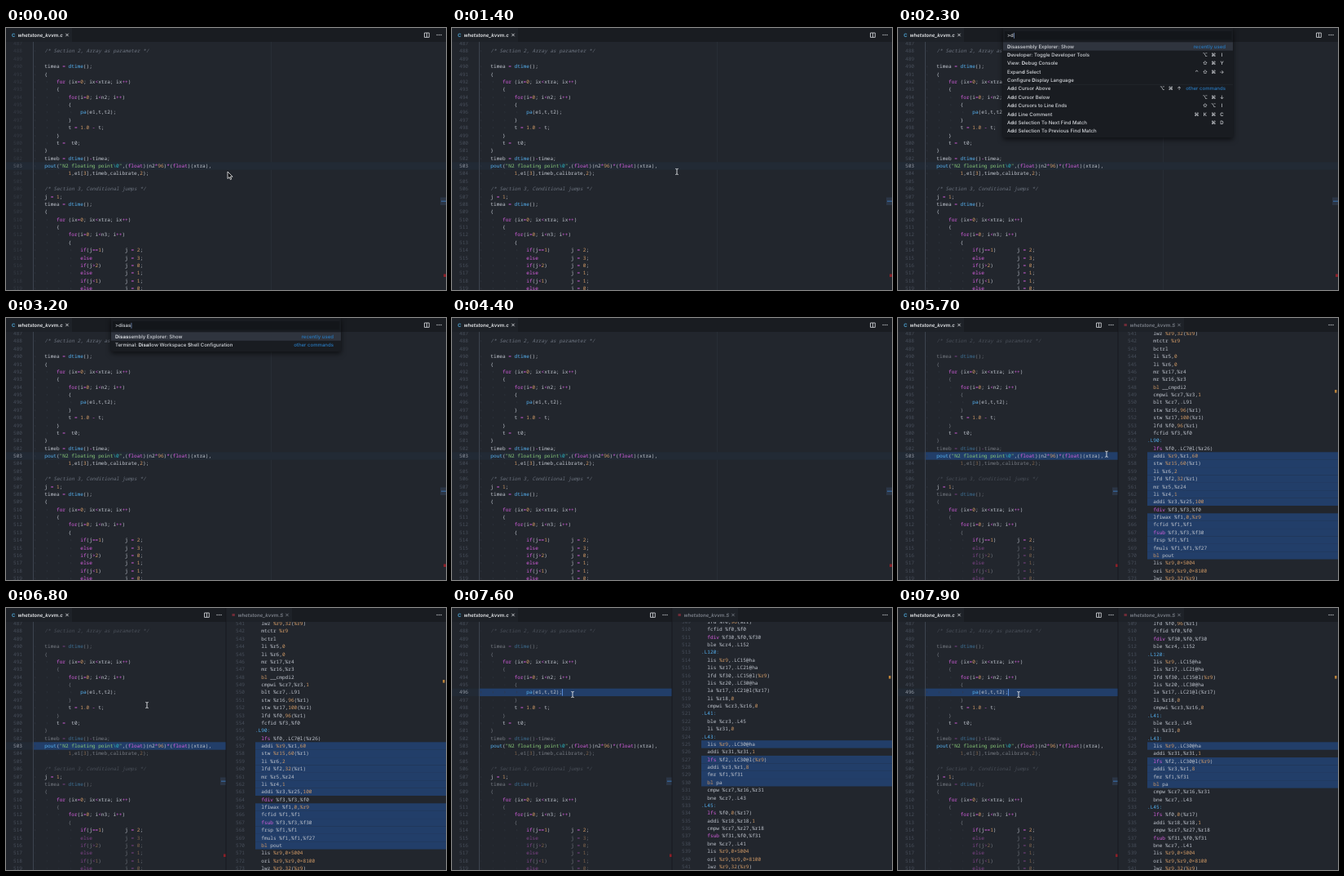
Animation of 540 by 321 pixels, one loop 8000 ms. Source, as an HTML page:

```html
<!DOCTYPE html>
<html lang="en">
<head>
<meta charset="utf-8">
<title>Disassembly view</title>
<style>
  html, body { margin: 0; width: 100%; height: 100%; overflow: hidden; background: #22262d; }
  svg { display: block; width: 540px; height: 321px; }
  text { white-space: pre; text-rendering: geometricPrecision; }
  .code { font: 500 6.1px "Noto Sans Mono", "DejaVu Sans Mono", monospace; fill: #bfc4cd; }
  .num { font-weight: 400; fill: #474e5a; text-anchor: end; }
  .num.on { fill: #9299a4; }
  .ws { fill: #333943; }
  .ui { font: 500 6.05px Inter, "DejaVu Sans", sans-serif; fill: #d3d6db; }
  .title { font-style: italic; font-weight: 600; }
  .mid { text-anchor: middle; }
  .end { text-anchor: end; }
</style>
</head>
<body>
<svg id="stage" viewBox="0 0 540 321"></svg>
<script>
const LOOP = 8000, PITCH = 9.375, CH = 3.66, MID = 169;
const TEXT_X = 32.7, ASM_X = 306, SPLIT = 270;
const PINK = '#d55fde', BLUE = '#55b0ef', ORANGE = '#d19a66', GREEN = '#89ca78',
      CYAN = '#2bbac5', GREY = '#6b727e', SELECT = '#223e69', BG = '#22262d', BAR = '#191c21';
const OPEN = 1900, CLOSE = 4400, SPLIT_AT = 4600, LINKED = 5000, REVEAL = 5050, SCROLL = 5125, CLICK = 7500;

const C_FIRST = 487;
const C_CODE = String.raw`

/* Section 2, Array as parameter */

timea = dtime();
{
    for (ix=0; ix<xtra; ix++)
    {
        for(i=0; i<n2; i++)
        {
            pa(e1,t,t2);
        }
        t = 1.0 - t;
    }
    t =  t0;
}
timeb = dtime()-timea;
pout("N2 floating point\0",(float)(n2*96)*(float)(xtra),
        1,e1[3],timeb,calibrate,2);

/* Section 3, Conditional jumps */
j = 1;
timea = dtime();
{
    for (ix=0; ix<xtra; ix++)
    {
        for(i=0; i<n3; i++)
        {
            if(j==1)       j = 2;
            else           j = 3;
            if(j>2)        j = 0;
            else           j = 1;
            if(j<1)        j = 1;
            else           j = 0;`.split('\n').slice(1);
const LIVE = [492, 494, 496, 498, 500, 503, 507, 510, 512, 514];

const ASM_FIRST = 509;
const ASM = `lfd %f0,96(%r1)
fcfid %f0,%f0
fdiv %f30,%f0,%f30
ble %cr4,.L152
.L120:
lis %r9,.LC15@ha
lis %r17,.LC21@ha
lfd %f30,.LC15@l(%r9)
lis %r20,.LC30@ha
la %r17,.LC21@l(%r17)
li %r18,0
cmpwi %cr3,%r16,0
.L41:
ble %cr3,.L45
li %r31,0
.L43:
lis %r9,.LC30@ha
addi %r31,%r31,1
lfs %f2,.LC30@l(%r9)
addi %r3,%r1,8
fmr %f1,%f31
bl pa
cmpw %cr7,%r16,%r31
bne %cr7,.L43
.L45:
lfs %f0,0(%r17)
addi %r18,%r18,1
cmpw %cr7,%r27,%r18
fsub %f31,%f0,%f31
bne %cr7,.L41
lis %r9,0×5004
ori %r9,%r9,0×8100
lwz %r9,32(%r9)
mtctr %r9
bctrl
li %r5,0
li %r6,0
mr %r17,%r4
mr %r16,%r3
bl __cmpdi2
cmpwi %cr7,%r3,1
blt %cr7,.L91
stw %r16,96(%r1)
stw %r17,100(%r1)
lfd %f0,96(%r1)
fcfid %f3,%f0
.L90:
lfs %f0,.LC7@l(%r26)
addi %r9,%r1,60
stw %r15,60(%r1)
li %r6,2
lfd %f2,32(%r1)
mr %r5,%r24
li %r4,1
addi %r3,%r25,100
fdiv %f3,%f3,%f0
lfiwax %f1,0,%r9
fcfid %f1,%f1
fsub %f3,%f3,%f30
frsp %f1,%f1
fmuls %f1,%f1,%f27
bl pout
lis %r9,0×5004
ori %r9,%r9,0×8100
lwz %r9,32(%r9)`.split('\n');

const C_RULES = [
  [/\/\*.*\*\//, GREY], [/(?<=\\0)"|"[^"\\]*/, GREEN], [/\\0/, CYAN],
  [/\b(?:for|if|else|float)\b|[=<>+*-]+/, PINK],
  [/\b(?:dtime|pa|pout)\b/, BLUE], [/\b\d[\d.]*\b/, ORANGE]];
const ASM_RULES = [
  [/^\.L\d+:/, BLUE], [/^(?:lfs|fsub|fdiv)\b/, PINK],
  [/^bl\b|%r(?:[89]|1[0-5])\b|(?<=[ ,])(?:0×\w+|\d+)(?=[(,]|$)/, ORANGE]];

const stage = document.getElementById('stage');

function el(tag, attrs, parent = stage, text) {
  const node = document.createElementNS('http://www.w3.org/2000/svg', tag);
  for (const k in attrs) node.setAttribute(k, attrs[k]);
  if (text !== undefined) node.textContent = text;
  return parent.appendChild(node);
}
const rect = (x, y, width, height, fill, parent) => el('rect', { x, y, width, height, fill }, parent);
const label = (x, y, cls, text, parent, style = '') => el('text', { x, y, class: cls, style }, parent, text);
const show = (node, on) => node.setAttribute('display', on ? 'inline' : 'none');
const move = (node, x, y) => node.setAttribute('transform', `translate(${x} ${y})`);
const rowY = (line, centre) => MID + (line - centre) * PITCH;

// Splits a line of code into coloured spans.
function paint(x, y, text, rules, parent) {
  const line = el('text', { x, y, class: 'code' }, parent);
  const all = new RegExp(rules.map(r => `(${r[0].source})`).join('|'), 'g');
  let last = 0;
  for (const m of text.matchAll(all)) {
    if (m.index > last) el('tspan', {}, line, text.slice(last, m.index));
    const kind = m.slice(1).findIndex(g => g !== undefined);
    const span = el('tspan', { fill: rules[kind][1] }, line, m[0]);
    if (m[0].startsWith('/*')) span.setAttribute('font-style', 'italic');
    last = m.index + m[0].length;
  }
  if (last < text.length) el('tspan', {}, line, text.slice(last));
}

function tab(x, name, fill, parent) {
  rect(x, 0, 81, 17, '#1e2228', parent);
  label(x + 14.5, 10.6, 'ui title', name, parent, 'fill:' + fill);
  el('path', { d: `M${x + 73.3} 6.8l3.4 3.4m0-3.4l-3.4 3.4`, stroke: fill, 'stroke-width': .8 }, parent);
}
function dots(x, parent) {
  for (const d of [-2.4, 0, 2.4]) el('circle', { cx: x + d, cy: 8.5, r: .7, fill: '#c9ccd1' }, parent);
}

// Left editor
rect(0, 0, 540, 321, BG);
const ruler = rect(325, 17, 1, 304, '#282d35');
const activeRow = rect(0, 0, 540, PITCH, '#222a35');
const leftMark = rect(TEXT_X, 0, SPLIT - TEXT_X, PITCH, SELECT);
rect(33, 17, 1, 304, '#3d444f');
const numbers = el('g', {});
const leftRows = C_CODE.map((text, i) => {
  const n = C_FIRST + i, y = rowY(n, 503) + 2.1, g = el('g', {});
  const indent = text.length - text.trimStart().length;
  if (text) {
    for (let c = 0; c <= indent; c += 4) label(TEXT_X + (c + .3) * CH, y, 'code ws', '›', g);
    paint(TEXT_X + (4 + indent) * CH, y, text.trimStart(), C_RULES, g);
  }
  return { n, g, num: label(20, y, 'code num', n, numbers) };
});
const caret = rect(0, 0, .8, 8.4, '#6aa0f0');
const scrollbar = rect(TEXT_X, 316, 180, 5, '#8a93a022');

const overview = el('g', {});
rect(533, 207.5, 7, 9.5, '#2b3545', overview);
rect(534, 211.7, 6, 1, '#3b74b3', overview);
rect(537, 301.5, 3, 3.5, '#8c1f28', overview);

rect(0, 0, 540, 17, BAR);
tab(0, 'whetstone_kvvm.c', '#e6e8eb', stage);
label(7, 10.8, 'ui', 'C', stage, 'font-weight:700;fill:#4a9cc9');
const tools = el('g', {});
el('path', { d: 'M513.5 6h5.8v5.4h-5.8zM516.4 6v5.4', fill: 'none', stroke: '#c9ccd1', 'stroke-width': .9 }, tools);
dots(531.5, tools);

// Right editor
const right = el('g', {});
rect(SPLIT, 0, 270, 321, BG, right);
const scroller = el('g', {}, right);
function marks(lines) {
  const g = el('g', {}, scroller);
  for (const n of lines) rect(ASM_X, n * PITCH - PITCH / 2, 234, PITCH + .05, SELECT, g);
  return g;
}
const poutMarks = marks([557, 558, 559, 560, 561, 562, 563, 565, 566, 567, 568, 569, 570]);
const paMarks = marks([525, 527, 528, 529, 530]);
const folds = el('g', {}, scroller);
ASM.forEach((text, i) => {
  const n = ASM_FIRST + i, y = n * PITCH, isLabel = text[0] === '.';
  label(293, y + 2.1, 'code num', n, scroller);
  paint(ASM_X + (isLabel ? 0 : 2 * CH), y + 2.1, text, ASM_RULES, scroller);
  if (isLabel) el('path', { d: `M299.3 ${y - 1.7}h3.4v3.4h-3.4zM300 ${y}h2`, fill: 'none', stroke: '#727984', 'stroke-width': .45 }, folds);
});
const asmMark = rect(536, 0, 2.5, 3.6, '#b98038', right);
rect(SPLIT, 0, 270, 17, BAR, right);
tab(SPLIT, 'whetstone_kvvm.S', '#7d828b', right);
rect(277.5, 7, 3.4, 3, '#6e2b37', right);
dots(531.5, right);
rect(SPLIT - .4, 0, .8, 321, '#15181c', right);

// Command palette
const palette = el('g', { style: 'filter:drop-shadow(0 2px 3px #000a)' });
const COMMANDS = [
  ['Disassembly Explorer: Show', ''], ['Developer: Toggle Developer Tools', '⌥⌘I'],
  ['View: Debug Console', '⇧⌘Y'], ['Expand Select', '⌃⇧⌘→'], ['Configure Display Language', ''],
  ['Add Cursor Above', '⌥⌘↑'], ['Add Cursor Below', '⌥⌘↓'], ['Add Cursors to Line Ends', '⇧⌥I'],
  ['Add Line Comment', '⌘K⌘C'], ['Add Selection To Next Find Match', '⌘D'],
  ['Add Selection To Previous Find Match', '']];
const DISALLOW = ['Terminal: Disallow Workspace Shell Configuration', ''];

function matches(query) {
  if (query.length < 2) return { rows: COMMANDS, other: 5 };
  if (query.length < 4) return { rows: [COMMANDS[0], COMMANDS[4], DISALLOW], other: 2 };
  return { rows: [COMMANDS[0], DISALLOW], other: 1 };
}
function boldParts(text, query) {
  if (!query) return text;
  if (query === 'disas' && text === DISALLOW[0]) return text.replace('Disa', '*Disa*').replace('Shell', '*S*hell');
  const word = new RegExp('\\b' + query, 'i');
  return text.replace(word.test(text) ? word : new RegExp(query, 'i'), '*$&*');
}
let drawn = null;
function drawPalette(query) {
  if (query === drawn) return;
  drawn = query;
  palette.replaceChildren();
  const { rows, other } = matches(query), step = 10.35;
  rect(129, 0, 282, 20.5 + rows.length * step, '#191c21', palette);
  rect(131, 4, 278.5, 10.5, '#13161a', palette);
  const input = label(134, 11.4, 'ui', '>' + query, palette);
  rect(134.4 + input.getComputedTextLength(), 5.8, .6, 7, '#8fb0e8', palette);
  rect(129, 17.3, 282, step, '#2f343e', palette);
  rows.forEach(([text, keys], i) => {
    const y = 24.7 + i * step, line = label(134, y, 'ui', '', palette);
    boldParts(text, query).split('*').forEach((part, k) =>
      el('tspan', { 'font-weight': k % 2 ? 700 : 500 }, line, part));
    const group = i === 0 ? 'recently used' : i === other ? 'other commands' : '';
    if (group) label(402, y, 'ui end', group, palette, 'fill:#2878bd');
    if (i === other) rect(129, y - 7.5, 282, .4, '#2c313a', palette);
    [...keys].reverse().forEach((key, k) =>
      label((group ? 345 : 397.5) - k * 10.3, y, 'ui mid', key, palette));
  });
}

// Pointers, drawn around the origin
const arrow = el('path', { d: 'M-2-5v8.6l2-1.9 1.4 3 1.3-.6-1.4-2.9h2.8z', fill: '#101215', stroke: '#fff', 'stroke-width': .75 });
const beam = el('path', { d: 'M-1.7-3.6Q0-3.6 0-2.5Q0-3.6 1.7-3.6M0-2.5V2.5M-1.7 3.6Q0 3.6 0 2.5Q0 3.6 1.7 3.6', fill: 'none', stroke: '#e4e6e9', 'stroke-width': .9 });
const PATH = [[0, 274, 181], [100, 274, 181], [900, 276, 176], [2000, 276, 176], [4600, 279, 180],
  [5400, 279, 180], [6400, 173, 119], [7000, 173, 119], [7400, 148, 106], [8000, 148, 106]];
const TYPED = [[2200, 'd'], [2500, 'di'], [2700, 'dis'], [2900, 'disa'], [3100, 'disas']];

function pointerAt(t) {
  const i = PATH.findIndex(p => p[0] > t), [t0, x0, y0] = PATH[i - 1], [t1, x1, y1] = PATH[i];
  const u = (t - t0) / (t1 - t0), k = u * u * (3 - 2 * u);
  return [x0 + (x1 - x0) * k, y0 + (y1 - y0) * k];
}
function glide(t, start, from, to) {
  const u = Math.min(1, Math.max(0, (t - start) / 125));
  return from + (to - from) * (1 - (1 - u) ** 3);
}

function render(t) {
  const split = t >= SPLIT_AT, linked = t >= LINKED, clicked = t >= CLICK;
  const active = clicked ? 496 : 503, activeTop = rowY(active, 503) - PITCH / 2;

  for (const { n, g, num } of leftRows) {
    g.setAttribute('opacity', linked && !LIVE.includes(n) ? .52 : 1);
    num.classList.toggle('on', n === active);
  }
  numbers.setAttribute('opacity', .5 + .5 * Math.min(1, t / 900));
  show(ruler, !split);
  show(leftMark, linked);
  leftMark.setAttribute('y', activeTop);
  activeRow.setAttribute('y', activeTop);
  show(caret, split && (clicked || t % 1000 < 500));
  move(caret, clicked ? 135.2 : 252.6, activeTop + .5);
  show(scrollbar, split && t < 5500);
  move(overview, split ? -SPLIT : 0, 0);
  move(tools, split ? -SPLIT : 0, 0);

  show(right, split);
  show(scroller, t >= REVEAL);
  show(asmMark, linked);
  asmMark.setAttribute('y', clicked ? 83 : t < SCROLL ? 166.5 : 88);
  const centre = clicked ? glide(t, CLICK, 557, 525) : glide(t, SCROLL, 540.8, 557);
  move(scroller, 0, MID - centre * PITCH);
  show(poutMarks, !clicked);
  show(paMarks, clicked);

  show(palette, t >= OPEN && t < CLOSE);
  if (t >= OPEN && t < CLOSE) drawPalette((TYPED.filter(s => s[0] <= t).pop() || [0, ''])[1]);

  const [x, y] = pointerAt(t), visible = t < 2000 || split;
  const gutter = split && x >= SPLIT, pointing = t < 200 || gutter;
  show(folds, gutter);
  show(arrow, visible && pointing);
  show(beam, visible && !pointing);
  arrow.setAttribute('transform', `translate(${x} ${y}) scale(${gutter ? -1 : 1} 1)`);
  move(beam, x, y);
}

const began = performance.now();
function tick() {
  render((performance.now() - began) % LOOP);
  requestAnimationFrame(tick);
}
tick();
</script>
</body>
</html>
```
